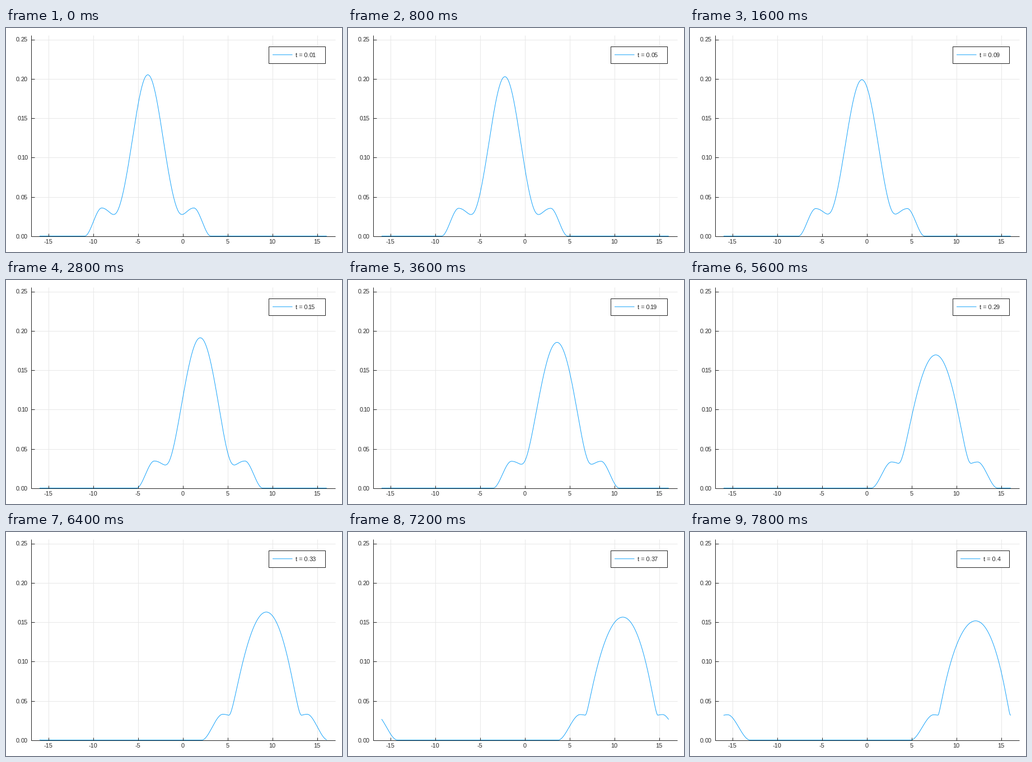
Write a matplotlib script that moves like this. It is 600 by 400 pixels and loops after 8 s.

```python
import matplotlib.pyplot as plt
import numpy as np
from matplotlib.animation import FuncAnimation
from matplotlib.patches import Rectangle

FRAMES, STEP_MS = 40, 200
X0, Y0, X_UNIT, Y_UNIT = 316.3, 371.5, 16, 1406
LEFT, RIGHT, TOP = 45.5, 588, 12
EM = 10.9           # font size in pixels
KERN = 2.6          # tightening between "." and "1"
PX = 0.72           # one pixel in points at 100 dpi
INK, GRID, BLUE = "#242424", "#e7e7e7", "#009afa"


def density(x, t):
    """Drifting packet: a bell that spreads into a dome, on a ring-like skirt."""
    centre = -4.36 + 42.2 * t - 2.6 * t**2
    r = (x - centre + 16) % 32 - 16
    r = abs(r + 0.5 * t * np.tanh((r / 4) ** 2))    # the front steepens

    # q near 0 gives a Gaussian, q = 1 a parabola
    peak = 0.205 / (1 + 1.54 * t**1.6)
    q = 1.5 * t + 4.2 * t**2
    k = 0.172 / (1 + 16 * t**2)
    core = peak * np.maximum(0, 1 - q * k * r**2) ** (1 / q)

    crest, edge = 5.15 - 4 * t**2, 7.03
    inner = np.exp(-((np.minimum(r, crest) - crest) / (1.9 + 4 * t)) ** 2)
    u = np.clip((edge - r) / (edge - crest), 0, 1)
    skirt = (0.0357 - 0.009 * t) * inner * u * u * (3 - 2 * u)
    return np.hypot(core, skirt)


def label(x, y, s, ha):
    return ax.text(x, y, s, ha=ha, va="baseline", color=INK, fontsize=EM * PX,
                   family="Liberation Sans", zorder=6)


def rule(x1, y1, x2, y2, color, z):
    # half a pixel off, so that snapping fills the wanted pixel row or column
    ax.plot([x1 - 0.5, x2 - 0.5], [y1 + 0.5, y2 + 0.5], color=color, lw=PX,
            zorder=z, solid_capstyle="butt")


def tight(digits):
    return KERN if digits[0] == "1" else 0


fig = plt.figure(figsize=(6, 4), dpi=100, facecolor="white")
ax = fig.add_axes([0, 0, 1, 1])
ax.set_xlim(0, 600)
ax.set_ylim(400, 0)
ax.axis("off")

for v in range(-15, 16, 5):
    px = X0 + X_UNIT * v
    rule(px, TOP, px, Y0, GRID, 1)
    rule(px, Y0 - 5, px, Y0, INK, 4)
    label(px - 1, 385, str(v), "center")

for k in range(6):
    py = Y0 - Y_UNIT * 0.05 * k
    rule(LEFT, py, RIGHT, py, GRID, 1)
    rule(LEFT, py, LEFT + 6, py, INK, 4)
    digits = f"{5 * k:02d}"
    label(38.8, py + 4.3, digits, "right")
    label(38.8 - 1.112 * EM + tight(digits), py + 4.3, "0.", "right")

rule(LEFT, TOP, LEFT, Y0, INK, 4)
rule(LEFT, Y0, RIGHT, Y0, INK, 4)

xs = np.linspace(-16, 16, 513)
curve, = ax.plot([], [], color=BLUE, lw=0.9 * PX, zorder=3)

box = Rectangle((469, 33), 101, 30, fc="white", ec=INK, lw=PX, zorder=5)
ax.add_patch(box)
sample, = ax.plot([], [], color=BLUE, lw=0.9 * PX, zorder=6, snap=False,
                  solid_capstyle="butt")
head = label(517, 52, "t = 0.", "left")
tail = label(541, 52, "", "left")


def draw(frame):
    t = (frame + 1) / 100
    curve.set_data(X0 + X_UNIT * xs, Y0 - Y_UNIT * density(xs, t))

    # trailing zeros are dropped, and the legend shrinks by one digit
    digits = f"{frame + 1:02d}".rstrip("0")
    shift = 7 * (2 - len(digits))
    box.set_x(469 + shift)
    box.set_width(101 - shift)
    sample.set_data([476 + shift, 511.5 + shift], [47.8, 47.8])
    head.set_x(517 + shift)
    tail.set_x(517 + shift + 2.252 * EM - tight(digits))
    tail.set_text(digits)
    return curve, box, sample, head, tail


anim = FuncAnimation(fig, draw, frames=FRAMES, interval=STEP_MS,
                     repeat=True, repeat_delay=0)
plt.show()
```
